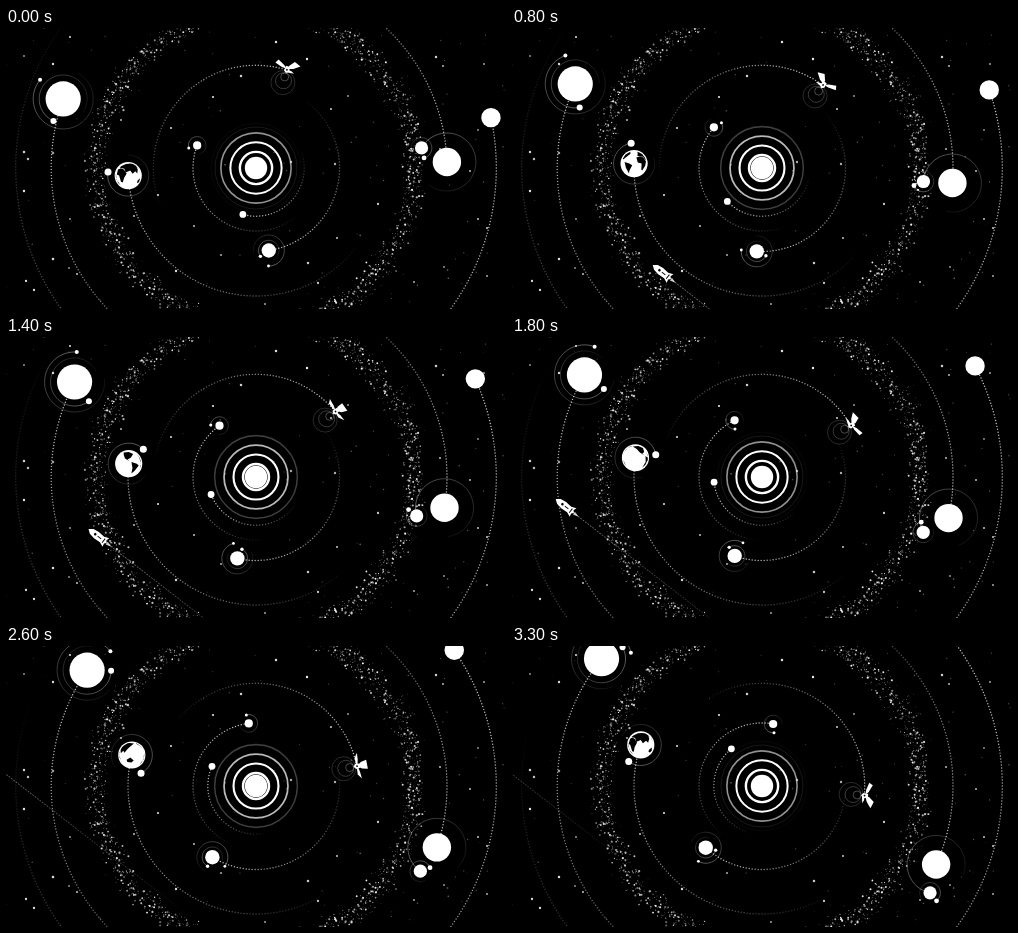
These frames come from a looping animation (500 by 281 pixels, 3400 ms). An HTML page with a canvas:

```html
<!DOCTYPE html>
<html lang="en">
<head>
<meta charset="utf-8">
<title>Solar system</title>
<style>
html, body { margin: 0; width: 100%; height: 100%; overflow: hidden; background: #000; }
canvas { display: block; }
</style>
</head>
<body>
<canvas id="stage" width="500" height="281"></canvas>
<script>
const LOOP = 3400, STEP = 100, W = 500, H = 281, CX = 250, CY = 140;
const RAD = Math.PI / 180, TAU = Math.PI * 2;
const ctx = document.getElementById('stage').getContext('2d');

// Angles in degrees, clockwise from the right; speed in degrees per second.
const body = (orbit, start, speed, size, tail, moons = [], globe = false) =>
  ({ orbit, start, speed, size, tail, moons, globe });
const moon = (orbit, start, speed, size, moons) => body(orbit, start, speed, size, 280, moons);

const planets = [
  body(48.2, 105.8, 37.8, 3.4, 125),
  body(63, 201, 24, 4.1, 150, [moon(8.8, 163, -242, 1.5)]),
  body(83.5, 81.2, 15.5, 7.2, 135, [moon(10.2, 145, -148.8, 1.7), moon(15.5, 91, 117.4, 1.4)]),
  body(128, 176.6, 6.7, 13.6, 140, [moon(20.5, 190, 89.7, 3.5)], true),
  body(191, -1.8, 7.9, 14.2, 100, [moon(29, 209, -32.4, 6.6, [moon(10.3, 76, 101.5, 2.4)])]),
  body(204.8, 199.7, 5.67, 17.6, 130, [moon(24, 114, -43.3, 3), moon(30, 219.6, 39, 2)]),
  body(240.3, -12.1, -8.58, 9.7, 235)
];

// Outlines as longitude, latitude pairs.
const continents = [
  [-15,30, 10,37, 33,30, 50,10, 38,-10, 25,-34, 15,-30, 10,0, -10,5],
  [-8,40, 0,50, 25,70, 100,75, 170,68, 140,50, 120,30, 105,10, 95,20, 78,8, 68,24, 45,14, 35,34],
  [-165,65, -90,70, -55,52, -80,28, -97,20, -85,10, -110,25, -125,45],
  [-78,8, -50,0, -36,-8, -55,-35, -70,-53, -72,-20],
  [115,-22, 135,-12, 152,-27, 140,-38, 116,-34]
];

const brightStars = [
  18,28, 47,36, 64,9, 122,59, 115,92, 165,100, 235,48, 207,69, 270,14, 301,31, 285,134, 329,136,
  47,125, 18,124, 22,131, 18,163, 64,191, 63,240, 20,253, 28,262, 47,231, 71,246, 128,188, 152,167,
  188,198, 215,227, 170,243, 259,276, 312,255, 302,235, 331,210, 372,176, 365,47, 342,68, 325,81,
  430,29, 437,38, 478,36, 472,102, 434,121, 464,143, 472,191, 481,200, 481,248, 438,239, 408,254
];

let seed = 7;
function random() {
  seed = (seed * 16807) % 2147483647;
  return seed / 2147483647;
}

const polar = (x, y, r, deg) => [x + r * Math.cos(deg * RAD), y + r * Math.sin(deg * RAD)];
const white = alpha => `rgba(255,255,255,${alpha})`;

function disc(c, x, y, r, color = '#fff') {
  c.fillStyle = color;
  c.beginPath();
  c.arc(x, y, r, 0, TAU);
  c.fill();
}

function ring(x, y, r, width, alpha) {
  ctx.strokeStyle = white(alpha);
  ctx.lineWidth = width;
  ctx.beginPath();
  ctx.arc(x, y, r, 0, TAU);
  ctx.stroke();
}

function polygon(points, color = '#fff') {
  ctx.fillStyle = color;
  ctx.beginPath();
  points.forEach(p => ctx.lineTo(...p));
  ctx.fill();
}

function makeSky() {
  const sky = document.createElement('canvas');
  sky.width = W;
  sky.height = H;
  const c = sky.getContext('2d');
  c.fillStyle = '#000';
  c.fillRect(0, 0, W, H);
  for (let i = 0; i < 110; i++)
    disc(c, random() * W, random() * H, 0.4 + random() * 0.4, white(0.15 + random() * 0.3));
  for (let i = 0; i < brightStars.length; i += 2)
    disc(c, brightStars[i], brightStars[i + 1], 0.9 + random() * 0.4, white(0.55 + random() * 0.4));
  for (let i = 0; i < 2300; i++) {
    const spread = (random() + random() + random()) / 3 - 0.5;
    const [x, y] = polar(CX, CY, 159 + spread * 34, random() * 360);
    disc(c, x, y, 0.3 + random() ** 3 * 0.85, white(0.35 + random() * 0.6));
  }
  return sky;
}
const sky = makeSky();

// Dots stay fixed on the orbit; only their brightness follows the planet.
function dottedTail(r, angle, length, dir) {
  const gap = 3 / (r * RAD), head = Math.floor(angle * dir / gap);
  for (let i = 0; i * gap < length; i++) {
    const [x, y] = polar(CX, CY, r, (head - i) * gap * dir);
    disc(ctx, x, y, 0.72, white(0.78 * (1 - i * gap / length) ** 0.8));
  }
}

function ringTail(x, y, r, angle, length, dir) {
  const part = 10;
  ctx.lineWidth = 0.8;
  for (let d = 0; d < length; d += part) {
    const a = (angle - d * dir) * RAD, b = (angle - (d + part) * dir) * RAD;
    ctx.strokeStyle = white(0.07 + 0.4 * (1 - d / length));
    ctx.beginPath();
    ctx.arc(x, y, r, a, b, dir > 0);
    ctx.stroke();
  }
}

function drawGlobe(x, y, r, t) {
  const turn = (t - 0.4) * 360 / 3.4;
  for (const land of continents) {
    const first = land[0], mid = (first + land[land.length >> 2 << 1]) / 2;
    const shift = turn - 15 - 360 * Math.round((mid + turn - 15) / 360);
    const points = [];
    for (let i = 0; i < land.length; i += 2) {
      const lon = Math.max(-90, Math.min(90, land[i] + shift)) * RAD, lat = land[i + 1] * RAD;
      points.push([x + r * Math.cos(lat) * Math.sin(lon), y - r * Math.sin(lat)]);
    }
    polygon(points, '#000');
  }
}

function drawBody(b, x, y, t, isMoon) {
  const angle = b.start + b.speed * t, dir = Math.sign(b.speed);
  if (isMoon) ringTail(x, y, b.orbit, angle, b.tail, dir);
  else dottedTail(b.orbit, angle, b.tail, dir);
  const [px, py] = polar(x, y, b.orbit, angle);
  disc(ctx, px, py, b.size);
  if (b.globe) drawGlobe(px, py, b.size - 1.2, t);
  b.moons.forEach(m => drawBody(m, px, py, t, true));
}

function drawSun(t) {
  const gap = 9.5, phase = (t / 0.3 + 0.54) % 1;
  for (let i = 0; i < 4; i++) {
    const r = 11 + (i + phase) * gap, far = (r - 11) / 34;
    if (far < 1) ring(CX, CY, r, 2.6 - far * 1.4, Math.min(1, 1.35 * (1 - far ** 1.6)));
  }
  ring(CX, CY, 41, 0.6, 0.16);
  disc(ctx, CX, CY, 11.2);
}

function drawSatellite(t) {
  const angle = -72.5 + 23.6 * t, orbit = 103.5;
  dottedTail(orbit - 0.8, angle, 130, 1);
  for (const [r, back] of [[12, 14], [8, 12], [4, 8]]) {
    const [x, y] = polar(CX, CY, orbit - back, angle);
    ring(x, y, r, 0.8, 0.42 - r * 0.018);
  }
  const [x, y] = polar(CX, CY, orbit, angle);
  ctx.save();
  ctx.translate(x, y);
  ctx.rotate((angle + 90) * RAD);
  for (let k = 0; k < 3; k++) {
    const a = (k * 120 - 109 * (t - 0.4)) * RAD, s = Math.sin(a), c = Math.cos(a);
    const at = (out, side) => [out * s + side * c, -out * (0.27 + 0.5 * c) + side * s * 0.42];
    polygon([at(2, -1), at(5, -3.4), at(12.5, -4.6), at(12.5, 4.6), at(5, 3.4), at(2, 1)]);
  }
  polygon([[-2, -3], [2, -3], [2.6, 2], [0, 4], [-2.6, 2]]);
  disc(ctx, 0, 0.5, 0.9, '#000');
  ctx.restore();
}

function drawRocket(t) {
  const vx = -97, vy = -75, speed = Math.hypot(vx, vy);
  ctx.save();
  ctx.translate(151 + vx * (t - 0.8), 245 + vy * (t - 0.8));
  ctx.rotate(Math.atan2(vy, vx));
  for (let d = 14; d < Math.min(270, 14 + speed * t); d += 3) {
    ctx.fillStyle = white(0.5 * (1 - d / 270));
    ctx.fillRect(-d, -0.4, 1.8, 0.8);
  }
  polygon([[13, 0], [9, -3], [3, -4], [-4, -3.4], [-9, -5.5], [-8, -2], [-10, 0],
    [-8, 2], [-9, 5.5], [-4, 3.4], [3, 4], [9, 3]]);
  polygon([[-10, -1.6], [-16, 0], [-10, 1.6]], white(0.8));
  disc(ctx, 4.5, 0, 1.3, '#000');
  ctx.fillStyle = '#000';
  ctx.fillRect(-6.5, -2.6, 0.9, 5.2);
  ctx.fillRect(-3, -0.4, 4.5, 0.8);
  ctx.restore();
}

function draw(now) {
  const t = Math.floor((now % LOOP) / STEP) * STEP / 1000;
  ctx.drawImage(sky, 0, 0);
  drawSun(t);
  planets.forEach(p => drawBody(p, CX, CY, t, false));
  drawSatellite(t);
  drawRocket(t);
  requestAnimationFrame(draw);
}
draw(0);
</script>
</body>
</html>
```
